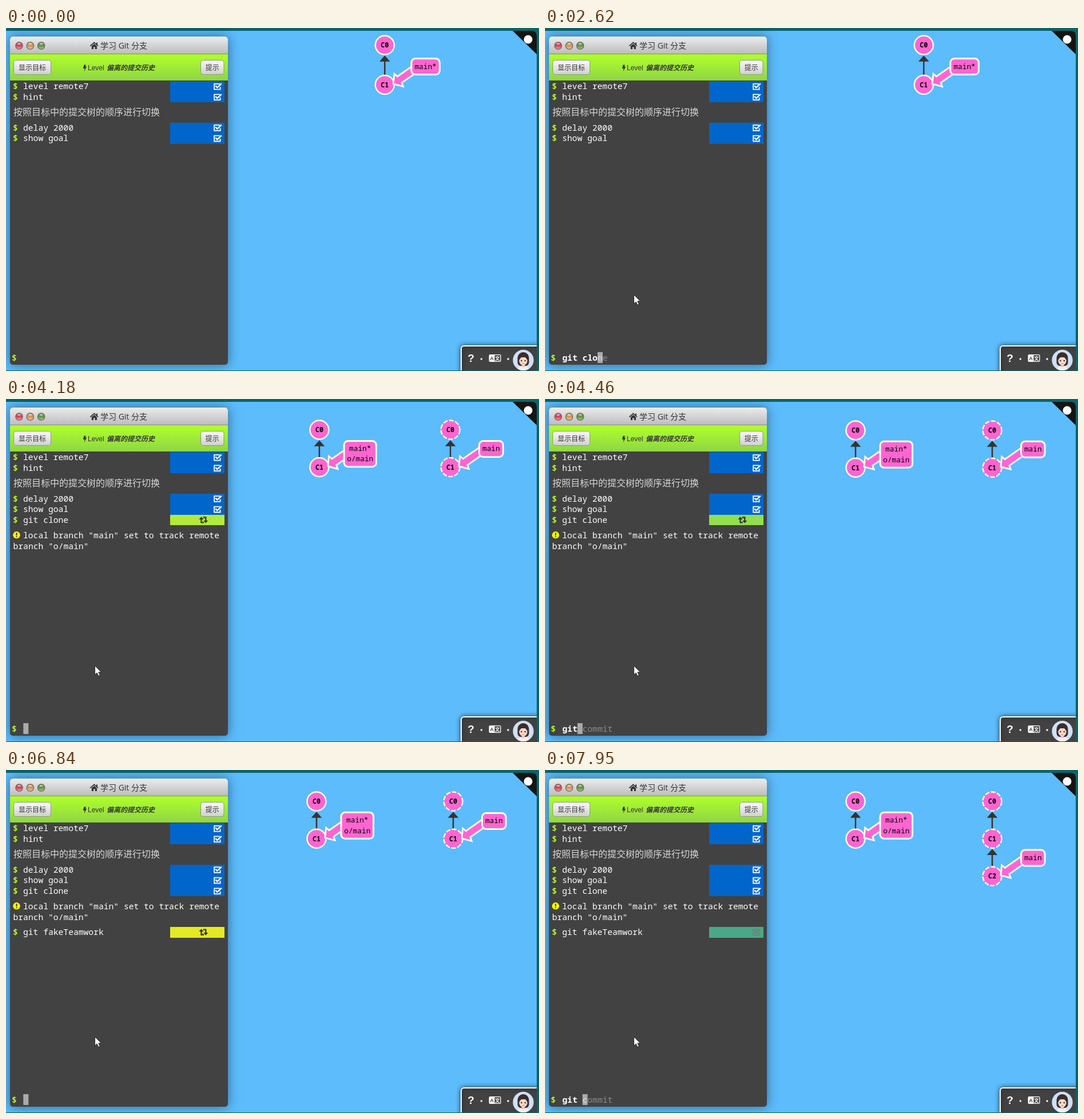
Animation of 932 by 601 pixels, one loop 8 s. Source, as an HTML page with a canvas:

```html
<!DOCTYPE html>
<html lang="zh">
<head>
<meta charset="utf-8">
<style>
html, body { margin: 0; width: 100%; height: 100%; overflow: hidden; background: #0b6468; }
canvas { display: block; }
</style>
</head>
<body>
<canvas id="stage" width="932" height="601"></canvas>
<script>
const ctx = document.getElementById('stage').getContext('2d');
const LOOP = 8000, CHAR = 8.8;
const CLONE = 3430, TEAMWORK = 6440;
const SPLIT_START = 3830, BIRTH_START = 6810;
const BLUE = '#5cbcfc', PINK = '#ff65d0', LIME = '#b2ff25', DARK = '#333', PANEL = '#424242';
const MONO = '"Noto Sans Mono", "DejaVu Sans Mono", monospace';
const SANS = '"Liberation Sans", "Noto Sans CJK SC", "Noto Sans CJK", sans-serif';
const TITLE = '"Open Sans", "Noto Sans CJK SC", "Noto Sans CJK", sans-serif';
const TERM = '500 14.66px ' + MONO, TERM_BOLD = 'bold 14.66px ' + MONO;
const LABEL = '500 12.8px ' + MONO;

const typed = [
  [0, ''], [1210, 'gi'], [1410, 'git'], [1480, 'git '], [2280, 'git c'], [2350, 'git cl'],
  [2620, 'git clo'], [2950, 'git clone'], [CLONE, ''],
  [4250, 'g'], [4320, 'gi'], [4460, 'git'], [4530, 'git '], [5290, 'git f'], [5570, 'git fa'],
  [5850, 'git fakeTeamwork'], [TEAMWORK, ''],
  [7670, 'g'], [7740, 'gi'], [7810, 'git'], [7950, 'git ']
];
const completions = ['git commit', 'git clone', 'git fakeTeamwork'];
const commands = [
  [93.2, 'level remote7', -9999], [111.8, 'hint', -9999],
  [165.5, 'delay 2000', -9999], [184.1, 'show goal', -9999],
  [202.7, 'git clone', CLONE], [274.9, 'git fakeTeamwork', TEAMWORK]
];
// Age of a command in ms, then red, green, blue
const statusColors = [
  [400, 228, 233, 37], [750, 178, 235, 55], [880, 163, 231, 62], [1170, 130, 215, 90],
  [1510, 74, 168, 136], [1930, 6, 108, 200], [2200, 0, 102, 204]
];
const checkShade = [[1170, 51], [1510, 122], [1930, 245], [2300, 255]];

const clamp = x => Math.min(1, Math.max(0, x));
const mix = (a, b, p) => a + (b - a) * p;
const smooth = x => { x = clamp(x); return x * x * (3 - 2 * x); };

function bounce(x) {
  x = clamp(x);
  const s = 7.5625, p = 2.75;
  if (x < 1 / p) return s * x * x;
  if (x < 2 / p) return s * (x - 1.5 / p) ** 2 + .75;
  if (x < 2.5 / p) return s * (x - 2.25 / p) ** 2 + .9375;
  return s * (x - 2.625 / p) ** 2 + .984375;
}

function sample(keys, x) {
  let i = 0;
  while (i < keys.length - 2 && x > keys[i + 1][0]) i++;
  const [a, b] = [keys[i], keys[i + 1]];
  const p = clamp((x - a[0]) / (b[0] - a[0]));
  return a.slice(1).map((v, k) => Math.round(mix(v, b[k + 1], p)));
}

function text(str, x, y, font, color, align = 'left') {
  ctx.font = font;
  ctx.fillStyle = color;
  ctx.textAlign = align;
  ctx.fillText(str, x, y);
}

function rect(x, y, w, h, fill) {
  ctx.fillStyle = fill;
  ctx.fillRect(x, y, w, h);
}

function rounded(x, y, w, h, radii, fill, stroke, width = 1) {
  ctx.beginPath();
  ctx.roundRect(x, y, w, h, radii);
  paint(fill, stroke, width);
}

function circle(x, y, r, fill, stroke, width = 1) {
  ctx.beginPath();
  ctx.arc(x, y, r, 0, Math.PI * 2);
  paint(fill, stroke, width);
}

function ellipse(x, y, rx, ry, fill) {
  ctx.beginPath();
  ctx.ellipse(x, y, rx, ry, 0, 0, Math.PI * 2);
  paint(fill);
}

function shape(points, fill, stroke, width = 1, closed = true) {
  ctx.beginPath();
  points.forEach(([x, y]) => ctx.lineTo(x, y));
  if (closed) ctx.closePath();
  paint(fill, stroke, width);
}

function paint(fill, stroke, width) {
  if (fill) { ctx.fillStyle = fill; ctx.fill(); }
  if (stroke) { ctx.strokeStyle = stroke; ctx.lineWidth = width; ctx.stroke(); }
}

function vertical(y0, y1, ...colors) {
  const g = ctx.createLinearGradient(0, y0, 0, y1);
  colors.forEach((c, i) => g.addColorStop(i / (colors.length - 1), c));
  return g;
}

function withShadow(blur, color, draw) {
  ctx.save();
  ctx.shadowBlur = blur;
  ctx.shadowColor = color;
  draw();
  ctx.restore();
}

function drawBackdrop() {
  rect(0, 0, 932, 601, '#0b6468');
  rounded(-8, 5, 936, 595, [0, 7, 0, 0], BLUE);
  ctx.save();
  ctx.clip();
  shape([[886, 5], [928, 5], [928, 46]], '#151513');
  ctx.restore();
  circle(913, 20, 7.5, '#fff');
}

function drawWindow() {
  withShadow(20, 'rgba(0,0,0,.45)', () => rounded(7, 15, 381, 575, 5, PANEL));
  rounded(7, 15, 381, 30, [5, 5, 0, 0], vertical(15, 45, '#ececec', '#bdbdbd'));
  rect(7, 45, 381, 1, '#888');
  [['#d8405a', '#f29aa2'], ['#cf9450', '#ecca9c'], ['#5f9440', '#a0c880']].forEach(([dark, light], i) => {
    const x = 23 + i * 19.3;
    circle(x, 31, 6.2, vertical(25, 37, dark, dark, light), '#77706c', 1.4);
    ellipse(x, 27.7, 3, 1.6, 'rgba(255,255,255,.5)');
  });

  shape([[147.5, 31.5], [154.3, 25.3], [161, 31.5]], null, DARK, 1.7, false);
  rect(158, 25.5, 2, 4, DARK);
  shape([[149.8, 31.7], [154.3, 27.8], [158.9, 31.7], [158.9, 37], [155.7, 37], [155.7, 33.3],
    [153, 33.3], [153, 37], [149.8, 37]], DARK);
  text('学习 Git 分支', 165, 36, '14px ' + TITLE, DARK);

  rect(7, 46, 381, 46, vertical(46, 92, '#b0ff2b', '#8fd644'));
  rect(7, 92, 381, 1, '#39422c');
  shape([[136.5, 64.5], [139.8, 64.5], [138.6, 68], [141.2, 67.6], [136.7, 76], [137.5, 70.4], [134.8, 71]], DARK);
  text('Level', 143, 74, '12px ' + SANS, DARK);
  text('偏离的提交历史', 176, 74, 'italic bold 12px ' + SANS, DARK);
  button(13.5, 65, '显示目标');
  button(340.5, 40.5, '提示');
}

function button(x, w, label) {
  rounded(x, 56.5, w, 25, 4, vertical(56, 82, '#fafafa', '#cfcfcf'), '#8b9a78');
  text(label, x + w / 2, 73.8, '12px ' + SANS, DARK, 'center');
}

function drawCheck(y, color) {
  shape([[374, y + 4.6], [364.2, y + 4.6], [364.2, y + 14.4], [374.6, y + 14.4], [374.6, y + 10]], null, color, 1.8, false);
  shape([[366.3, y + 8], [369.4, y + 11.2], [376.8, y + 4.2]], null, color, 2.4, false);
}

function drawWorking(y) {
  const arrow = (x, dir) => {
    const c = y + 9.2;
    shape([[x - 4, c - dir], [x, c - 5.6 * dir], [x + 4, c - dir]], DARK);
    shape([[x, c - 2 * dir], [x, c + 4.4 * dir], [x + 4.6 * dir, c + 4.4 * dir]], null, DARK, 2.3, false);
  };
  arrow(341.5, 1);
  arrow(349.3, -1);
}

function drawCommands(t) {
  for (const [y, name, at] of commands) {
    const age = t - at;
    if (age < 0) continue;
    text('$', 12, y + 14, TERM_BOLD, LIME);
    text(name, 30, y + 14, TERM, '#fff');
    const top = Math.round(y);
    rect(287, top, 95, Math.round(y + 18.6) - top, `rgb(${sample(statusColors, age)})`);
    if (age < 1170) drawWorking(y);
    else {
      const [shade] = sample(checkShade, age);
      drawCheck(y, `rgb(${shade},${shade},${shade})`);
    }
  }
  text('按照目标中的提交树的顺序进行切换', 13, 153, '300 16px "Noto Sans CJK SC", "Noto Sans CJK", sans-serif', '#d8d8d8');
  if (t >= SPLIT_START) {
    circle(18.5, 238.3, 6.2, '#ffff00');
    rect(17.5, 234.2, 2, 5, DARK);
    rect(17.5, 240.3, 2, 2, DARK);
    text('local branch "main" set to track remote', 30, 244, TERM, '#fff');
    text('branch "o/main"', 12.5, 262.6, TERM, '#fff');
  }
}

function drawPrompt(t) {
  const base = 583;
  text('$', 10, base, TERM_BOLD, LIME);
  if (t < 480) return;
  const input = typed.filter(([at]) => at <= t).pop()[1];
  const x = 30.3 + input.length * CHAR;
  text(input, 30.3, base, TERM_BOLD, '#fff');
  rect(x, 568, 9, 19, '#aaa');
  if (!input) return;
  const rest = completions.find(c => c.startsWith(input)).slice(input.length);
  text(rest.slice(0, 1), x, base, TERM, '#ddd');
  text(rest.slice(1), x + CHAR, base, TERM, '#8a8a8a');
}

function drawEdge(x, childY, parentY) {
  const tip = parentY + 18.3;
  rect(x - 1.25, tip + 8, 2.5, Math.max(0, childY - tip - 8), DARK);
  shape([[x, tip], [x + 9.3, tip + 10.5], [x - 9.3, tip + 10.5]], DARK);
}

function drawCommit(name, x, y, dashed, scale = 1) {
  ctx.save();
  if (dashed) ctx.setLineDash([8, 2.7]);
  circle(x, y, 16.5 * scale, PINK, '#fff', 2.4 * scale);
  ctx.restore();
  text(name, x, y + 4.2, 'bold 11.7px ' + MONO, '#000', 'center');
}

function drawBranch(x, y, w, h, name) {
  ctx.save();
  ctx.translate(x + 15, y - 1.5);
  ctx.rotate(-35 * Math.PI / 180);
  shape([[0, 0], [11.5, -13.5], [13.3, -6.7], [50, -6.7], [50, 6.7], [13.3, 6.7], [11.5, 13.5]], PINK, '#fff', 2.8);
  ctx.restore();
  rounded(x + 71.3 - w / 2, y - 46, w, h, 7, PINK, '#fff', 3);
  text(name, x + 71.3, y - 28, LABEL, '#000', 'center');
}

function drawTrees(t) {
  const split = smooth((t - SPLIT_START) / 400);
  const y0 = mix(30, 55, split), y1 = mix(99.5, 120.3, split);
  if (t >= SPLIT_START) drawRemote(t, mix(662.3, 782, split), y0, y1, split);

  const x = mix(662.3, 543, split);
  drawEdge(x, y1, y0);
  drawCommit('C1', x, y1);
  drawCommit('C0', x, y0);
  drawBranch(x, y1, mix(49.5, 56.5, split), mix(28, 46, split), 'main*');
  if (t >= SPLIT_START) {
    text('o/main', x + 71.3, mix(y1 - 48, y1 - 9, split), LABEL, '#000', 'center');
  }
}

function drawRemote(t, x, y0, y1, split) {
  const birth = bounce((t - BIRTH_START) / 800);
  drawEdge(x, y1, y0);
  if (t > BIRTH_START) {
    const y2 = mix(y1, 186, birth);
    ctx.globalAlpha = birth;
    drawEdge(x, y2, y1);
    ctx.globalAlpha = birth * birth;
    circle(x, y2, 15 * birth, BLUE);
    drawCommit('C2', x, y2, true, birth);
    ctx.globalAlpha = 1;
  }
  drawCommit('C1', x, y1, true);
  drawCommit('C0', x, y0, true);
  const branchY = mix(y1, 186, smooth((t - BIRTH_START) / 400));
  drawBranch(x, branchY, mix(49.5, 41.5, split), 28, 'main');
}

function drawToolbar() {
  ctx.save();
  ctx.beginPath();
  ctx.rect(0, 0, 928, 600);
  ctx.clip();
  withShadow(8, 'rgba(0,0,0,.6)', () => rounded(796, 557, 150, 60, 5, PANEL, '#fff', 2));
  text('?', 813, 585, 'bold 19px ' + SANS, '#fff', 'center');
  circle(831.3, 580, 1.7, '#fff');
  circle(878, 580, 1.7, '#fff');

  rounded(844.5, 572, 21, 13, 2, '#fff');
  rect(854.4, 573.3, 9.8, 10.4, PANEL);
  text('A', 849.6, 582, 'bold 9px ' + SANS, PANEL, 'center');
  text('文', 859.3, 582, 'bold 8.5px ' + SANS, '#fff', 'center');

  circle(904.5, 582, 18.2, '#cfe0f5');
  ctx.clip();
  rounded(894.5, 568, 20, 24, [10, 10, 6, 6], '#3d2c2c');
  ellipse(904.5, 601, 12, 9, '#f3eff0');
  rect(902, 588, 5, 6, '#f0c3ae');
  ellipse(904.5, 583, 7.2, 8.2, '#f9d8c7');
  shape([[896, 583], [897, 573], [906, 570], [913, 575], [913, 583], [908, 577], [901, 577]], '#3d2c2c');
  circle(901.3, 583, 1.2, '#33262a');
  circle(907.8, 583, 1.2, '#33262a');
  rect(903, 587.5, 3, 1, '#d0605f');
  ctx.restore();
}

function drawPointer(t) {
  if (t < 130) return;
  const p = smooth((t - 110) / 340);
  ctx.save();
  ctx.translate(mix(548, 155.5, p), mix(455, 467.5, p));
  shape([[0, 0], [0, 15.6], [3.6, 12.2], [6.2, 17.8], [8.8, 16.6], [6.3, 11.2], [11, 11.2]], '#fff', '#222', .9);
  ctx.restore();
}

function frame(now) {
  const t = now % LOOP;
  drawBackdrop();
  drawWindow();
  drawCommands(t);
  drawPrompt(t);
  drawTrees(t);
  drawToolbar();
  drawPointer(t);
  requestAnimationFrame(frame);
}
requestAnimationFrame(frame);
</script>
</body>
</html>
```
